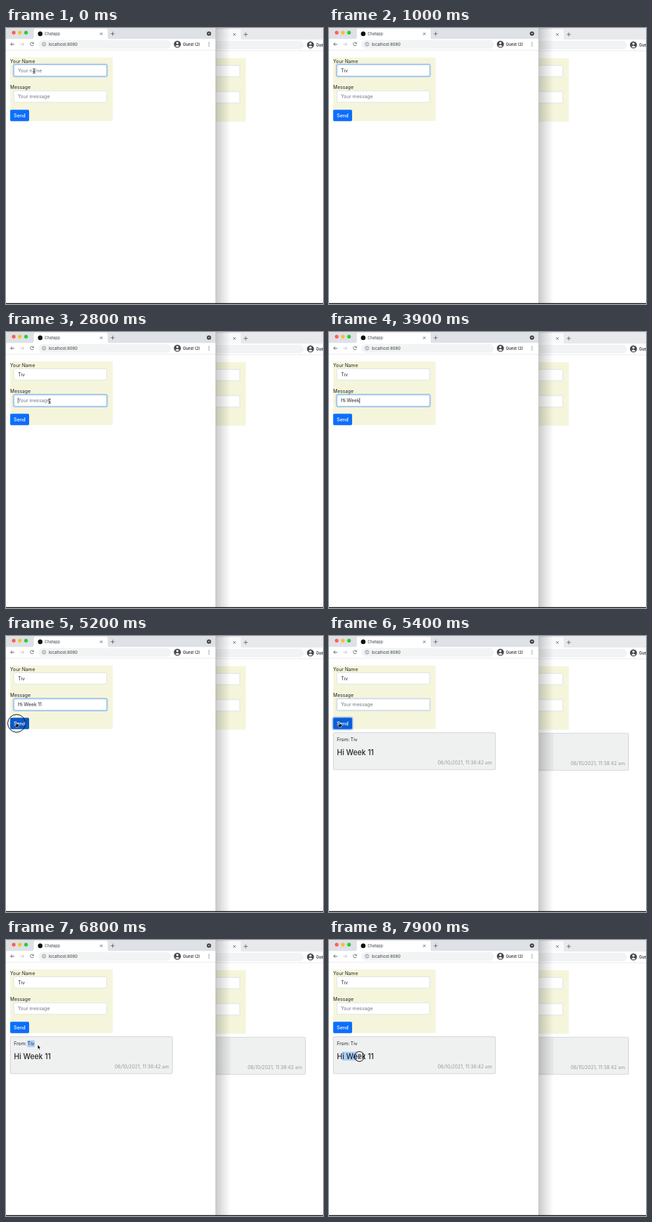
Animation of 480x417 px, one loop 8000 ms. Source, as an HTML page:

```html
<!DOCTYPE html>
<html lang="en">
<head>
<meta charset="utf-8">
<title>Chat form</title>
<style>
  html, body { margin: 0; width: 100%; height: 100%; overflow: hidden; background: #fff; }
  svg { display: block; width: 100vw; height: 100vh; }
  text { font: 7.2px Inter, Roboto, sans-serif; fill: #212529; white-space: pre; }
  .ui { font-size: 5.8px; fill: #3c4043; }
  .line { fill: none; stroke: #5f6368; stroke-width: .9; }
  .input { fill: #fff; stroke: #ced4da; stroke-width: .6; }
  .halo { fill: none; stroke: #0d6efd; stroke-opacity: .27; stroke-width: 2; }
  .edge { fill: none; stroke: #86b7fe; stroke-width: .6; }
  .hint { fill: #6c757d; }
  .select { fill: #abcffb; }
  .caret { fill: #111; }
</style>
</head>
<body>
<svg viewBox="0 0 480 417" preserveAspectRatio="none">
  <defs>
    <linearGradient id="shade">
      <stop offset="0" stop-opacity=".2"/>
      <stop offset=".55" stop-opacity=".085"/>
      <stop offset="1" stop-opacity="0"/>
    </linearGradient>

    <g id="chrome">
      <rect y="-1" width="318" height="18" style="fill:var(--bar)"/>
      <path d="M39 17q3 0 3-3V4q0-3 3-3H151q3 0 3 3v10q0 3 3 3z" style="fill:var(--tab)"/>
      <rect y="16.5" width="318" height="17" fill="#fff"/>
      <rect y="33" width="318" height=".6" fill="#dcdee1"/>
      <path class="line" d="M142.5 7l3.6 3.6m0-3.6l-3.6 3.6M158.5 8.7h6m-3-3v6"/>
      <rect x="49" y="18.3" width="200.500" height="13" rx="6.500" fill="#f1f3f4"/>
      <circle cx="259.500" cy="24.500" r="5.300" fill="#45494e"/>
      <circle cx="259.500" cy="22.800" r="1.700" fill="#fff"/>
      <path d="M256.200 27.300q3.300-3.200 6.600 0q-3.300 2.600-6.600 0z" fill="#fff"/>
      <text class="ui" x="268" y="26.700" style="fill:#202124;font-weight:500">Guest (2)</text>
    </g>

    <g id="form">
      <rect x="6.300" y="44.600" width="155.400" height="96" fill="#f5f5dc"/>
      <text x="6.300" y="52.700">Your Name</text>
      <text x="6.300" y="92.200">Message</text>
      <rect class="input" x="12" y="55.500" width="140.500" height="17.200" rx="1.800"/>
      <rect class="input" x="12" y="95" width="140.500" height="17.200" rx="1.800"/>
    </g>

    <rect id="card" x="6.600" y="146" width="245.400" height="56" rx="1.800" fill="#eff1f1" stroke="#c6c9cb" stroke-width=".8"/>
    <text id="date" x="246.700" y="194.200" text-anchor="end" style="fill:#999">06/10/2021, 11:38:42 am</text>

    <g id="ibeam" fill="none" stroke-linecap="round">
      <path d="M-1.500-3.500Q0-3.500 0-2.500V2.500Q0 3.500-1.500 3.500M1.500-3.500Q0-3.500 0-2.500M0 2.500Q0 3.500 1.500 3.500M-1 .8H1" stroke="#fff" stroke-width="1.700"/>
      <path d="M-1.500-3.500Q0-3.500 0-2.500V2.500Q0 3.500-1.500 3.500M1.500-3.500Q0-3.500 0-2.500M0 2.500Q0 3.500 1.500 3.500M-1 .8H1" stroke="#111" stroke-width=".8"/>
    </g>
    <path id="arrow" d="M-1-3V3.200L.5 1.900 1.500 4.200 2.600 3.700 1.600 1.500H3.500z" fill="#000" stroke="#fff" stroke-width=".5"/>
    <path id="hand" d="M-.8-3.500q.7-.7 1.300 0V-1.200L2.800-.7q.9.300.7 1.200L2.800 3.700H-.8L-2.900.8q-.1-1 .9-.7L-.8 1z" fill="#000" stroke="#fff" stroke-width=".6"/>
  </defs>

  <rect width="480" height="417" fill="#fff"/>
  <g transform="translate(201.500 1)" style="--bar:#e7e9ec;--tab:#f8f9fa">
    <use href="#chrome"/>
    <use href="#form"/>
    <g class="sent"><use href="#card"/><use href="#date"/></g>
  </g>
  <rect class="sent" x="318" y="148" width="22" height="55" fill-opacity=".025"/>
  <rect x="318" width="22" height="416" fill="url(#shade)"/>

  <g style="--bar:#dee1e6;--tab:#fff">
    <rect width="317.500" height="417" fill="#fff"/>
    <svg width="317.500" height="417">
      <use href="#chrome"/>
      <circle cx="11.700" cy="7" r="2.800" fill="#fe5f57"/>
      <circle cx="21" cy="7" r="2.800" fill="#febc2e"/>
      <circle cx="30.300" cy="7" r="2.800" fill="#28c840"/>
      <circle cx="51.800" cy="8.700" r="3.500" fill="#111"/>
      <text class="ui" x="58.500" y="10.700">Chatapp</text>
      <circle cx="307.300" cy="8.400" r="3.200" fill="#3c4043"/>
      <path d="M305.800 7.700h3l-1.500 1.900z" fill="#fff"/>
      <path class="line" d="M12.700 24.500H7m2.700-2.700L7 24.500l2.700 2.700"/>
      <path class="line" d="M21.500 24.500h5.700m-2.700-2.700l2.700 2.700-2.700 2.700" style="stroke:#c1c4c8"/>
      <path class="line" d="M41.300 22.800a2.500 2.500 0 1 0 .3 2.500M41.700 21.500v2h-2"/>
      <circle class="line" cx="57.500" cy="24.500" r="2.700" style="stroke-width:.7"/>
      <path class="line" d="M57.500 24.200v1.700M57.500 22.700v.7" style="stroke-width:.7"/>
      <text class="ui" x="64.500" y="26.600" style="font-size:6.200px">localhost:8080</text>
      <g fill="#5f6368"><circle cx="307.300" cy="22.300" r=".7"/><circle cx="307.300" cy="24.600" r=".7"/><circle cx="307.300" cy="26.900" r=".7"/></g>
    </svg>
    <use href="#form"/>
    <g id="nameRing">
      <rect class="halo" x="11.200" y="54.700" width="142.100" height="18.800" rx="2.500"/>
      <rect class="edge" x="12" y="55.500" width="140.500" height="17.200" rx="1.800"/>
    </g>
    <g id="msgRing">
      <rect class="halo" x="11.200" y="94.200" width="142.100" height="18.800" rx="2.500"/>
      <rect class="edge" x="12" y="95" width="140.500" height="17.200" rx="1.800"/>
    </g>
    <text id="name" x="18" y="66.700"></text>
    <text id="msg" x="18" y="106.200"></text>
    <rect id="caret" class="caret" width=".6" height="8.600"/>
    <rect id="sendRing" class="halo" x="5.500" y="122.800" width="30.300" height="18.700" rx="2.500" style="stroke-opacity:.5"/>
    <rect id="send" x="6.300" y="123.600" width="28.700" height="17.100" rx="1.800"/>
    <text x="20.650" y="134.700" text-anchor="middle" style="fill:#fff;font-weight:500">Send</text>
    <g class="sent">
      <use href="#card"/>
      <rect id="wordMark" class="select" x="32.200" y="151.400" height="10.400"/>
      <rect id="dragMark" class="select" y="168.700" height="13.600"/>
      <text x="12" y="159">From: </text>
      <text id="from" x="32.600" y="159">Tiv</text>
      <text id="title" x="11.900" y="179.800" style="font-size:11.100px;font-weight:500">Hi Week 11</text>
      <use href="#date"/>
    </g>
  </g>
  <rect x="317.400" width=".7" height="416" fill="#a9abad"/>
  <rect y="415.700" width="480" height="1.300" fill="#111"/>

  <circle id="ring" fill="none" stroke="#111" stroke-width="1"/>
  <use id="cursor"/>
</svg>
<script>
const LOOP = 8000;
const $ = id => document.getElementById(id);
const set = (el, attrs) => { for (const k in attrs) el.setAttribute(k, attrs[k]); };
const show = (el, on) => { el.style.display = on ? '' : 'none'; };
const clamp = v => Math.max(0, Math.min(1, v));
const ramp = (t, from, len = 150) => clamp((t - from) / len);
const ease = v => v * v * (3 - 2 * v);
const within = (t, a, b) => t >= a && t < b;

const sender = 'Tiv', message = 'Hi Week 11';
const nameKeys = [100, 150, 200];
const msgKeys = [2900, 3100, 3300, 3500, 3700, 3800, 3900, 4000, 4200, 4300];

// time, x, y
const path = [
  [0, 42.5, 65], [1500, 42.5, 65], [1700, 38, 104.5], [2150, 38, 104.5], [2300, 66, 104.5],
  [4650, 66, 104.5], [5100, 16, 134], [5550, 16, 134], [5800, 36, 190], [6100, 38.5, 157],
  [6400, 37, 157], [6650, 37, 157], [6800, 49, 161.5], [7000, 49, 161.5], [7300, 20, 176],
  [7400, 20, 176], [7900, 46, 176], [LOOP, 46, 176]
];
const presses = [[1700, 1900], [5200, 5400], [6450, 6530], [6560, 6680], [7400, LOOP]];

function pointer(t) {
  const i = Math.max(1, path.findIndex(p => p[0] > t));
  const a = path[i - 1], b = path[i];
  const k = ease(clamp((t - a[0]) / (b[0] - a[0])));
  return [a[1] + (b[1] - a[1]) * k, a[2] + (b[2] - a[2]) * k];
}

function cursorShape(x, y) {
  if (x < 35 && y > 123 && y < 141) return 'hand';
  const overText = y < 113 || (y > 151 && y < 161 && x < 42) || (y > 168 && y < 183 && x < 68);
  return overText ? 'ibeam' : 'arrow';
}

function typed(el, text, keys, t, hint, cleared) {
  const count = cleared ? 0 : keys.filter(k => k <= t).length;
  el.textContent = count ? text.slice(0, count) : hint;
  el.setAttribute('class', count ? '' : 'hint');
  return count ? el.getComputedTextLength() + .4 : 0;
}

function drawCaret(t, nameEnd, msgEnd) {
  const inName = t < 1750;
  const start = [...nameKeys, 1800, ...msgKeys].filter(k => k <= t).pop() ?? -500;
  const on = t < 5300 && (within(t, 1750, 1800) || (t - start) % 1000 < 500);
  show($('caret'), on);
  set($('caret'), { x: 17.8 + (inName ? nameEnd : msgEnd), y: inName ? 59.8 : 99.3 });
}

function drawSelection(t, x) {
  const word = within(t, 6600, 7400);
  set($('wordMark'), { width: word ? $('from').getComputedTextLength() + .8 : 0 });
  let end = 0;
  const title = $('title'), start = title.getEndPositionOfChar(0).x;
  if (t >= 7400) {
    for (let i = 1; i < message.length; i++) {
      const a = title.getStartPositionOfChar(i).x, b = title.getEndPositionOfChar(i).x;
      if (x > (a + b) / 2) end = b;
    }
  }
  set($('dragMark'), { x: start, width: Math.max(0, end - start) });
}

function draw(t) {
  const [x, y] = pointer(t);
  const sent = t >= 5400;
  const nameEnd = typed($('name'), sender, nameKeys, t, 'Your name', false);
  const msgEnd = typed($('msg'), message, msgKeys, t, 'Your message', sent);
  drawCaret(t, nameEnd, msgEnd);

  $('nameRing').style.opacity = 1 - ramp(t, 1800);
  $('msgRing').style.opacity = ramp(t, 1800) * (1 - ramp(t, 5300));
  $('sendRing').style.opacity = ramp(t, 5300) * (1 - ramp(t, 6450));
  const dark = within(t, 5000, 6500);
  $('send').style.fill = within(t, 5200, 5400) ? '#0a58ca' : dark ? '#0b5ed7' : '#0d6efd';

  document.querySelectorAll('.sent').forEach(el => show(el, sent));
  if (sent) drawSelection(t, x);

  show($('cursor'), !within(t, 100, 1500) && !within(t, 2850, 4700));
  set($('cursor'), { href: '#' + cursorShape(x, y), transform: `translate(${x} ${y})` });

  const press = presses.find(p => within(t, p[0], p[1]));
  show($('ring'), press);
  if (press) set($('ring'), { cx: x, cy: y - (cursorShape(x, y) === 'hand' ? 2 : 0), r: 13.5 - 6 * ramp(t, press[0], 110) });
}

const begin = performance.now();
function tick() {
  draw((performance.now() - begin) % LOOP);
  requestAnimationFrame(tick);
}
tick();
</script>
</body>
</html>
```
